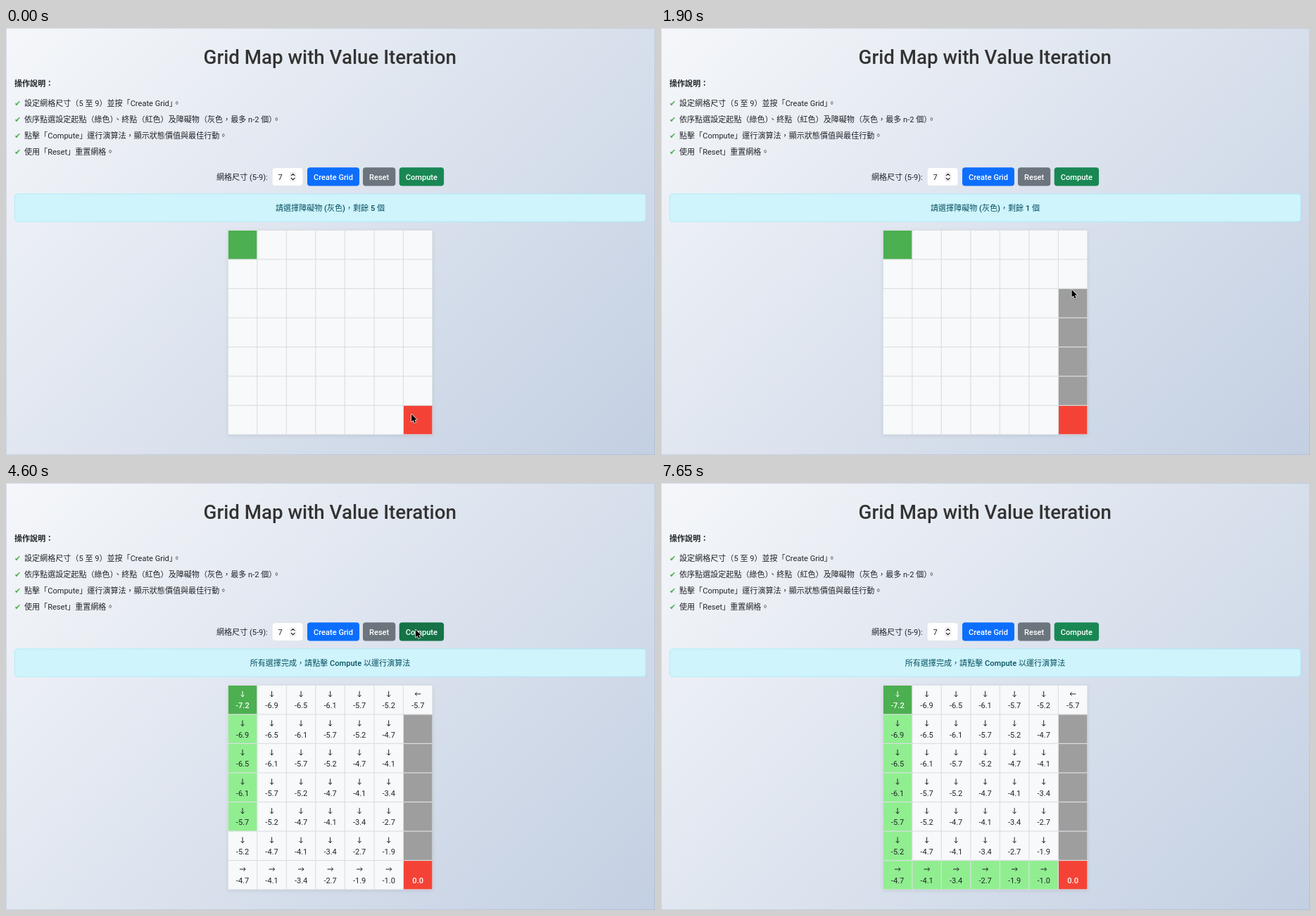
An HTML page for the animation above (8 s loop, 922 by 607 pixels).

```html
<!DOCTYPE html>
<html lang="zh-Hant">
<head>
<meta charset="utf-8">
<title>Grid Map with Value Iteration</title>
<style>
  html, body { margin: 0; width: 100%; height: 100%; overflow: hidden; }
  body { background: linear-gradient(135deg, #f5f7fa 0%, #c3cfe2 100%); }
  svg { display: block; width: 922px; height: 607px; }
  text { font: 400 11.07px Roboto, "Noto Sans CJK TC", "Noto Sans CJK", sans-serif; fill: #212529; }
  .title { font-size: 27.7px; font-weight: 500; fill: #333; }
  .heading { font-weight: 700; }
  .tick { font-family: "DejaVu Sans", sans-serif; fill: #4caf50; }
  .mid { text-anchor: middle; }
  .button { font-weight: 500; fill: #fff; }
  .message { font-weight: 500; fill: #055160; }
  .light { font-weight: 500; fill: #fff; }
</style>
</head>
<body>
<svg id="stage" viewBox="0 0 922 607" xmlns="http://www.w3.org/2000/svg">
  <defs>
    <filter id="shadow" x="-10%" y="-10%" width="120%" height="120%">
      <feDropShadow dx="0" dy="1.4" stdDeviation="2.8" flood-color="#000" flood-opacity=".1"/>
    </filter>
    <filter id="cursorShadow" x="-50%" y="-50%" width="200%" height="200%">
      <feDropShadow dx="0" dy=".6" stdDeviation=".6" flood-color="#000" flood-opacity=".3"/>
    </filter>
  </defs>
</svg>
<script>
const LOOP = 8000, STEP = 50, SIZE = 7;
const GRID = { x: 315.3, y: 287.4, pitch: 41.52 };
const COLOR = {
  empty: '#f8f9fa', line: '#dcdfe2', start: '#4caf50', goal: '#f44336',
  wall: '#9e9e9e', path: '#90ee90', idle: [25, 135, 84], hover: [21, 115, 71]
};
const WALL_TIMES = [550, 950, 1300, 1750, 2250];  // from the bottom cell up
const COMPUTE_AT = 3400, PATH_STEP = 300;
const HOVER_IN = 3040, HOVER_OUT = 7070, FADE = 150;

// time, x, y of the pointer
const POINTER = [
  [0, 575, 547.5], [350, 576, 512], [500, 576, 512], [750, 578, 477.5],
  [900, 578, 477.5], [1150, 578, 427], [1400, 578, 427], [1600, 581, 395],
  [1700, 582, 395], [2100, 583, 346], [2500, 583, 346], [3200, 581, 207],
  [7000, 581, 207], [7300, 595, -18]
];

const stage = document.getElementById('stage');

function add(tag, attrs, parent = stage) {
  const node = document.createElementNS('http://www.w3.org/2000/svg', tag);
  for (const key in attrs) node.setAttribute(key, attrs[key]);
  parent.appendChild(node);
  return node;
}

function label(x, y, content, className = '', parent = stage) {
  const node = add('text', { x, y, class: className }, parent);
  node.textContent = content;
  return node;
}

function box(x, y, width, height, fill, rx = 0, stroke = 'none') {
  return add('rect', { x, y, width, height, fill, rx, stroke, 'stroke-width': .7 });
}

function button(x, width, content, fill) {
  const rect = box(x, 198.2, width, 26.4, fill, 4.1);
  label(x + width / 2, 215.6, content, 'button mid');
  return rect;
}

add('rect', { x: .5, y: .5, width: 921, height: 606, fill: 'none', stroke: 'rgba(140,160,190,.3)' });
label(460.2, 50.6, 'Grid Map with Value Iteration', 'title mid');
label(12, 83.3, '操作說明：', 'heading');
[
  '設定網格尺寸（5 至 9）並按「Create Grid」。',
  '依序點選設定起點（綠色）、終點（紅色）及障礙物（灰色，最多 n-2 個）。',
  '點擊「Compute」運行演算法，顯示狀態價值與最佳行動。',
  '使用「Reset」重置網格。'
].forEach((line, i) => {
  const y = 110.6 + i * 23.2;
  label(12, y, '✔', 'tick');
  label(26, y, line);
});

label(299, 215.6, '網格尺寸 (5-9):');
box(378.2, 198.5, 43.8, 25.8, '#fff', 4, '#dee2e6');
label(386.4, 215.6, '7');
box(403.6, 205.2, 8, 12.8, '#fff', 3, '#d5d5d5');
add('path', {
  d: 'M405.3 209.7l2.3-2.4 2.3 2.4M405.3 213.5l2.3 2.4 2.3-2.4', fill: 'none',
  stroke: '#222', 'stroke-width': 1.2, 'stroke-linecap': 'round', 'stroke-linejoin': 'round'
});
button(428, 74, 'Create Grid', '#0d6efd');
button(507, 46.3, 'Reset', '#6c757d');
const computeButton = button(558.7, 63.4, 'Compute', '#198754');

box(12.4, 235.9, 896.4, 39.3, '#cff4fc', 4.1, '#9eeaf9');
const message = label(460.5, 260.2, '', 'message mid');

const side = GRID.pitch * SIZE;
box(GRID.x, GRID.y, side, side, COLOR.line).setAttribute('filter', 'url(#shadow)');

const ARROWS = {
  down: 0, left: 90, right: -90
};
const cells = [];
const results = add('g', {});
for (let row = 0; row < SIZE; row++) {
  for (let col = 0; col < SIZE; col++) {
    const x = GRID.x + col * GRID.pitch, y = GRID.y + row * GRID.pitch;
    const rect = box(x + .6, y + .6, GRID.pitch - 1.2, GRID.pitch - 1.2, COLOR.empty);
    cells.push({ row, col, rect });
    addResult(row, col, x + GRID.pitch / 2, y);
  }
}
stage.appendChild(results);

function addResult(row, col, cx, y) {
  const last = SIZE - 1;
  const corner = row === 0 && col === last, goal = row === last && col === last;
  if (col === last && !corner && !goal) return;
  const distance = corner ? 8 : 2 * last - row - col;
  const value = -10 * (1 - .9 ** distance);
  const light = goal || row + col === 0;
  label(cx, y + 32.7, goal ? '0.0' : value.toFixed(1), light ? 'mid light' : 'mid', results);
  if (goal) return;
  const direction = corner ? 'left' : row === last ? 'right' : 'down';
  add('path', {
    d: 'M0-4.1V4M-2.4 1.5L0 4.1L2.4 1.5', fill: 'none',
    stroke: light ? '#fff' : '#212529', 'stroke-width': 1,
    transform: `translate(${cx} ${y + 12.5}) rotate(${ARROWS[direction]})`
  }, results);
}

const pointer = add('g', { filter: 'url(#cursorShadow)' });
add('path', {
  d: 'M1 1.4V12.3L3.5 10L5.2 13.9L7.1 13.1L5.4 9.2H8.8Z',
  fill: '#000', stroke: '#fff', 'stroke-width': 1.3, 'paint-order': 'stroke', 'stroke-linejoin': 'round'
}, pointer);

const clamp = v => Math.max(0, Math.min(1, v));
const ease = v => v * v * (3 - 2 * v);
const mix = (a, b, k) => a + (b - a) * k;

function pointerAt(t) {
  const i = POINTER.findIndex(key => key[0] > t);
  if (i < 0) return POINTER[POINTER.length - 1].slice(1);
  const [t0, x0, y0] = POINTER[i - 1], [t1, x1, y1] = POINTER[i];
  const k = ease((t - t0) / (t1 - t0));
  return [mix(x0, x1, k), mix(y0, y1, k)];
}

function cellColor(row, col, t) {
  const last = SIZE - 1;
  if (row + col === 0) return COLOR.start;
  if (row + col === 2 * last) return COLOR.goal;
  if (col === last && row > 0) return t >= WALL_TIMES[last - 1 - row] ? COLOR.wall : COLOR.empty;
  const onPath = col === 0 || row === last;
  return onPath && t >= COMPUTE_AT + PATH_STEP * (row + col) ? COLOR.path : COLOR.empty;
}

function render(t) {
  const left = WALL_TIMES.filter(time => t < time).length;
  message.textContent = left
    ? `請選擇障礙物 (灰色)，剩餘 ${left} 個`
    : '所有選擇完成，請點擊 Compute 以運行演算法';
  for (const { row, col, rect } of cells) rect.setAttribute('fill', cellColor(row, col, t));
  results.setAttribute('visibility', t >= COMPUTE_AT ? 'visible' : 'hidden');
  const hover = clamp((t - HOVER_IN) / FADE) - clamp((t - HOVER_OUT) / FADE);
  const shade = COLOR.idle.map((v, i) => Math.round(mix(v, COLOR.hover[i], hover)));
  computeButton.setAttribute('fill', `rgb(${shade})`);
  pointer.setAttribute('transform', `translate(${pointerAt(t)})`);
}

const began = performance.now();
function tick() {
  const t = (performance.now() - began) % LOOP;
  render(Math.floor(t / STEP) * STEP);
  requestAnimationFrame(tick);
}
tick();
</script>
</body>
</html>
```
